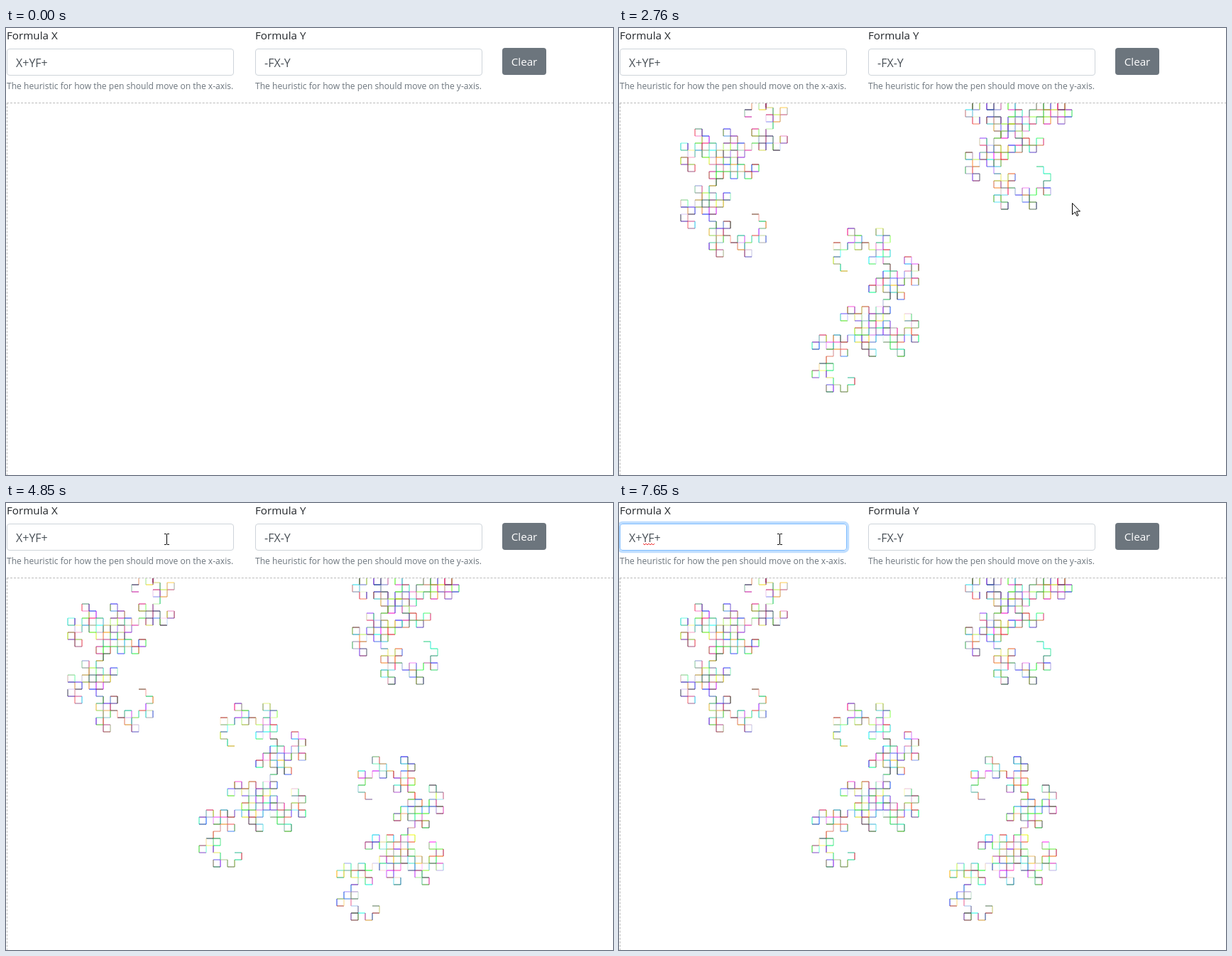
Recreate the animation shown at these times as an HTML page with a canvas. Size 855 px wide and 629 px high, loop 8000 ms.

```html
<!DOCTYPE html>
<html lang="en">
<head>
<meta charset="utf-8">
<title>Dragon curve painter</title>
<style>
html, body { margin: 0; width: 100%; height: 100%; overflow: hidden; background: #fff; }
body { position: relative; font: 15.2px/24px "Open Sans", "Noto Sans", sans-serif; color: #212529; }
body > * { position: absolute; box-sizing: border-box; white-space: pre; }
.x { left: 1px; }
.y { left: 351px; }
.label { top: -2px; }
.field { top: 29px; width: 320px; height: 38px; padding: 7px 12px; border: 1px solid #ced4da; border-radius: 4px; font-size: 16px; color: #495057; }
.help { top: 72px; font-size: 12.1px; line-height: 19px; color: #6c757d; }
.button { left: 699px; top: 28px; width: 62px; height: 38px; line-height: 38px; text-align: center; color: #fff; background: #6c757d; border-radius: 4px; }
.pad { left: 1px; top: 105px; width: 900px; height: 600px; border: 1px dashed #bbb; }
canvas { left: 0; top: 0; }
</style>
</head>
<body>
<div class="label x">Formula X</div>
<div class="field x" id="fx">X+YF+</div>
<div class="help x">The heuristic for how the pen should move on the x-axis.</div>
<div class="label y">Formula Y</div>
<div class="field y">-FX-Y</div>
<div class="help y">The heuristic for how the pen should move on the y-axis.</div>
<div class="button">Clear</div>
<div class="pad"></div>
<canvas id="stage" width="855" height="629"></canvas>
<script>
const LOOP = 8000, STEP = 10, DEPTH = 8;
const TOP = 105;      // the pen cannot leave the pad upwards
const OFFSET = 50;    // from the click back to the pen's start
const DELAY = 450;    // from reaching the spot to the painted curve
const BEAM = 4850, FOCUS = 6010, GLOW = 6260, BLINK = 580;

const ctx = document.getElementById('stage').getContext('2d');
const field = document.getElementById('fx');

// Pointer stops as time, x, y
const clicks = [[440, 237, 312], [1360, 372, 392], [2310, 638, 245], [3220, 566, 467]];
const hops = [[190, 271, 332], [1140, 175, 290], [2060, 594, 263],
  [4390, 260, 132], [4620, 228, 90], [BEAM, 223, 42]];
const stops = [...clicks, ...hops].sort((a, b) => a[0] - b[0]);

function expand(axiom, depth) {
  const rules = { X: 'X+YF+', Y: '-FX-Y' };
  let s = axiom;
  while (depth--) s = s.replace(/[XY]/g, c => rules[c]);
  return s;
}
const program = expand('X', DEPTH);

function random(seed) {
  return () => {
    seed = (seed * 1664525 + 1013904223) >>> 0;
    return seed / 4294967296;
  };
}

function drawCurve(x, y, heading, seed) {
  const rnd = random(seed);
  const channel = () => Math.floor(rnd() * 256);
  let dx = 0, dy = heading;
  ctx.lineWidth = 1;
  for (const c of program) {
    if (c === '+') [dx, dy] = [-dy, dx];
    else if (c === '-') [dx, dy] = [dy, -dx];
    else if (c === 'F') {
      ctx.strokeStyle = `rgb(${channel()},${channel()},${channel()})`;
      ctx.beginPath();
      ctx.moveTo(x, y);
      x += dx * STEP;
      y = Math.max(TOP, y + dy * STEP);
      ctx.lineTo(x, y);
      ctx.stroke();
    }
  }
}

function drawCurves(t) {
  ctx.save();
  ctx.beginPath();
  ctx.rect(2, TOP + 1, 853, 523);
  ctx.clip();
  clicks.forEach(([at, x, y], i) => {
    if (t >= at + DELAY) drawCurve(x - OFFSET, y - OFFSET, i % 2 ? 1 : -1, at);
  });
  ctx.restore();
}

function drawArrow(x, y) {
  ctx.save();
  ctx.translate(x + 0.5, y + 0.5);
  const shape = new Path2D('M0 0V16L4 12.5 6.5 18 8.5 17 6 11.5H11Z');
  ctx.fillStyle = '#fff';
  ctx.fill(shape);
  ctx.strokeStyle = '#000';
  ctx.lineWidth = 1;
  ctx.stroke(shape);
  ctx.restore();
}

function drawBeam(x, y) {
  ctx.fillStyle = '#000';
  for (const end of [y, y + 15]) {
    ctx.fillRect(x, end, 3, 1);
    ctx.fillRect(x + 4, end, 3, 1);
  }
  ctx.fillRect(x + 3, y + 1, 1, 14);
}

function drawSquiggle() {
  ctx.beginPath();
  for (let x = 34; x <= 50; x += 2) ctx.lineTo(x, x % 4 ? 57 : 59);
  ctx.strokeStyle = '#e33';
  ctx.lineWidth = 1;
  ctx.stroke();
}

function drawFocus(t) {
  const focused = t >= FOCUS;
  field.style.borderColor = focused ? '#80bdff' : '';
  field.style.boxShadow = t >= GLOW ? '0 0 0 3.2px rgba(0,123,255,.25)' : '';
  if (!focused) return;
  drawSquiggle();
  const blink = Math.floor((t - FOCUS + 100) / BLINK);
  if (blink % 2 === 0) {
    ctx.fillStyle = '#495057';
    ctx.fillRect(62, 38, 1, 21);
  }
}

function draw(t) {
  ctx.clearRect(0, 0, 855, 629);
  drawCurves(t);
  drawFocus(t);
  const stop = stops.filter(s => t >= s[0]).pop();
  if (stop) (t >= BEAM ? drawBeam : drawArrow)(stop[1], stop[2] + 1);
}

function tick() {
  draw(performance.now() % LOOP);
  requestAnimationFrame(tick);
}
tick();
</script>
</body>
</html>
```
